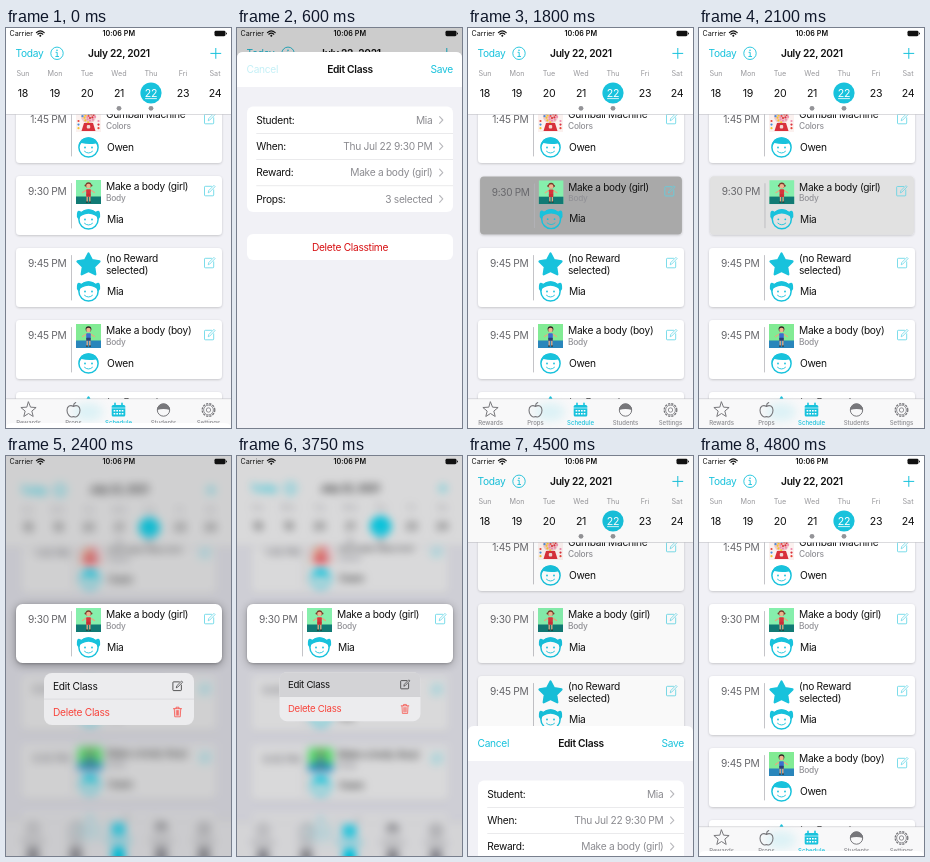
Recreate the animation shown at these times as an HTML page. Size 225 px wide and 400 px high, loop 4.95 s.

```html
<!DOCTYPE html>
<html lang="en">
<head>
<meta charset="utf-8">
<title>Class schedule</title>
<style>
html, body { margin: 0; width: 100%; height: 100%; overflow: hidden; background: #f1f1f6; }
svg { display: block; width: 100vw; height: 100vh; }
text { font-family: Inter, "Liberation Sans", sans-serif; white-space: pre; }
</style>
</head>
<body>
<svg id="stage" viewBox="0 0 225 400" preserveAspectRatio="none"></svg>
<script>
const LOOP = 4950, STEP = 150;
const CYAN = '#18c2dc', GRAY = '#8b8b90', PAGE = '#f1f1f6';
const SHEET_TOP = 24;

// Drawing helpers
const rect = (x, y, w, h, fill, r = 0, more = '') =>
  `<rect x="${x}" y="${y}" width="${w}" height="${h}" rx="${r}" fill="${fill}" ${more}/>`;
const circle = (x, y, r, fill, more = '') =>
  `<circle cx="${x}" cy="${y}" r="${r}" fill="${fill}" ${more}/>`;
const ring = (x, y, r, color, w = 1, more = '') =>
  circle(x, y, r, 'none', `stroke="${color}" stroke-width="${w}" ${more}`);
const line = (d, color, w = 1, more = 'stroke-linecap="round"') =>
  `<path d="${d}" fill="none" stroke="${color}" stroke-width="${w}" stroke-linejoin="round" ${more}/>`;
const shape = (d, fill) => `<path d="${d}" fill="${fill}"/>`;
const at = (x, y, body, scale = 1) => `<g transform="translate(${x} ${y}) scale(${scale})">${body}</g>`;

function text(x, y, s, { size = 10.2, fill = '#111', anchor = 'start', weight = 400, id = '' } = {}) {
  const spacing = size > 8 ? -0.028 * size : 0;
  return `<text ${id && `id="${id}"`} x="${x}" y="${y}" font-size="${size}" fill="${fill}" ` +
    `text-anchor="${anchor}" font-weight="${weight}" letter-spacing="${spacing}">${s}</text>`;
}

function starPath(r, inner) {
  const pts = Array.from({ length: 10 }, (_, i) => {
    const a = i * Math.PI / 5 - Math.PI / 2, q = i % 2 ? inner : r;
    return (q * Math.cos(a)).toFixed(2) + ' ' + (q * Math.sin(a)).toFixed(2);
  });
  return 'M' + pts.join('L') + 'Z';
}

// Icons, each centred on 0,0
const pencilBox = color =>
  line('M2 -4.5H-4.2Q-5 -4.5 -5 -3.7V4.2Q-5 5 -4.2 5H3.4Q4.2 5 4.2 4.2V-1', color, 0.8) +
  line('M-1.2 1.6L-.8 -.2L4.4 -5.4L5.6 -4.2L.5 1Z', color, 0.7);

const trash = color =>
  line('M-4.4 -3.6H4.4M-1.6 -3.8V-5.2H1.6V-3.8M-3.5 -3.4L-3 5.2H3L3.5 -3.4M-1.3 -1.6V3.5M0 -1.6V3.5M1.3 -1.6V3.5', color, 0.8);

const face = girl =>
  ring(0, 0, 9.6, CYAN, 1.5) +
  (girl
    ? shape('M-9.8 -1Q-9.5 -10 0 -10.3Q9.5 -10 9.8 -1Q7 -5.4 0 -5.8Q-7 -5.4 -9.8 -1Z', CYAN) +
      shape('M-7 -7.5Q-11.5 -11 -11.6 -5Q-12.4 -2 -10 0ZM7 -7.5Q11.5 -11 11.6 -5Q12.4 -2 10 0Z', CYAN)
    : shape('M-9.8 -1Q-9.5 -10 0 -10.3Q9.5 -10 9.8 -1L7.5 -4Q0 -2.6 -7 -4.4Z', CYAN)) +
  circle(-3.5, 0, 0.9, CYAN) + circle(3.5, 0, 0.9, CYAN) +
  line('M-4 3.8Q0 7.4 4 3.8', CYAN, 0.9);

const kid = (girl, shirt, pants) =>
  rect(-12.5, -12, 25, 24, girl ? '#86efac' : '#82eb94') +
  rect(-12.5, 4.5, 25, 7.5, girl ? '#117a74' : '#2a86bb') +
  line('M-2 -2L-6 0.5M2 -2L6 0.5', '#e7a981', 1.2) +
  line('M-1.3 4V9.5M1.3 4V9.5', '#e7a981', 1.3) +
  rect(-2.3, -2.8, 4.6, 5, shirt, 0.8) + rect(-2.3, 1.8, 4.6, 3, pants, 0.5) +
  circle(0, -6.9, 2.9, girl ? '#7a3a2a' : '#2f2424') +
  (girl ? circle(-3, -6.4, 1, '#7a3a2a') + circle(3, -6.4, 1, '#7a3a2a') : '') +
  circle(0, -6, 2.3, '#efb48e') +
  line('M-2 10H-1M1 10H2', '#222', 1.1);

function gumballs() {
  const colors = ['#e8443a', '#f08cb0', '#4a90d9', '#d8303a', '#f4c430'];
  let s = rect(-12.5, -12, 25, 24, '#fbf1ef') + circle(0, -4, 7.6, '#f0c9c9');
  for (let i = 0; i < 22; i++) {
    const r = 1.45 * Math.sqrt(i), a = i * 2.4;
    s += circle((r * Math.cos(a)).toFixed(1), (r * Math.sin(a) - 4).toFixed(1), 1.1, colors[i % 5]);
  }
  s += shape('M-4.5 3H4.5L7 11H-7Z', '#d8303a') + rect(-1.7, 5, 3.4, 3.4, '#f1d9d6', 1);
  for (let i = 0; i < 6; i++)
    s += circle(i % 2 ? 10 : -10, 1 + 3.6 * (i >> 1), 1.1, colors[i % 5]);
  return s;
}

const bigStar = `<path d="${starPath(11.6, 6)}" fill="${CYAN}" stroke="${CYAN}" stroke-width="2.2" stroke-linejoin="round"/>`;

// One class card, with its top left corner on 0,0
function card({ time, art, title, sub, name, girl }, id = '') {
  const lines = Array.isArray(title) ? title : [title];
  return rect(0, 0, 206, 59, '#fff', 4, `filter="url(#shadow)" ${id && `id="${id}"`}`) +
    text(50.5, 19.4, time, { fill: '#67676b', anchor: 'end' }) +
    line('M55.5 7.5V52', '#b5b5ba', 0.8) +
    at(72.5, 16, art) +
    lines.map((s, i) => text(90, 14.4 + 11.8 * i, s)).join('') +
    (sub ? text(90, 24.6, sub, { size: 8.4, fill: '#929297', weight: 500 }) : '') +
    at(72.5, 43.5, face(girl)) +
    text(91, 46.8, name) +
    at(193.5, 14.8, pencilBox('#5bd3e5'));
}

const BOY = 'Owen', GIRL = 'Mia';
const noReward = { time: '9:45 PM', art: at(0, 1, bigStar), title: ['(no Reward', 'selected)'], name: GIRL, girl: true };
const classes = [
  { time: '1:45 PM', art: gumballs(), title: 'Gumball Machine', sub: 'Colors', name: BOY },
  { time: '9:30 PM', art: kid(true, '#d9343c', '#c92f38'), title: 'Make a body (girl)', sub: 'Body', name: GIRL, girl: true },
  noReward,
  { time: '9:45 PM', art: kid(false, '#3a6fd0', '#2b3f78'), title: 'Make a body (boy)', sub: 'Body', name: BOY },
  noReward
];

const cards = () => classes.map((c, i) => i === 1 ? '' : at(10, 76 + 72 * i, card(c))).join('');

function header() {
  const days = ['Sun', 'Mon', 'Tue', 'Wed', 'Thu', 'Fri', 'Sat'];
  return rect(-20, -30, 265, 116, '#fff') + rect(-20, 86, 265, 0.6, '#c4c4c8') +
    text(9.5, 29, 'Today', { fill: CYAN }) +
    ring(51, 25.3, 6.2, CYAN, 0.9) +
    line('M50 24.3H51.2V28.4M49.8 28.5H52.6', CYAN, 0.9) + circle(51, 22.2, 0.8, CYAN) +
    text(112.9, 28.8, 'July 22, 2021', { anchor: 'middle', weight: 600 }) +
    line('M204.8 25.4H214.8M209.8 20.4V30.4', CYAN, 1) +
    circle(145, 65, 10.6, CYAN) +
    days.map((d, i) => {
      const x = 17 + 32 * i;
      return text(x, 48.4, d, { size: 7.2, fill: '#98989c', anchor: 'middle' }) +
        text(x, 68.8, 18 + i, { size: 10.6, fill: i === 4 ? '#fff' : '#111', anchor: 'middle' });
    }).join('') +
    line('M139.5 70.6H150.5', '#fff', 0.8) +
    circle(113, 80.3, 2.4, '#949498') + circle(145, 80.3, 2.4, '#949498');
}

function tabBar() {
  const c = '#77777b';
  const tabs = [
    ['Rewards', line(starPath(8, 3.5), c)],
    ['Props', line('M0 -3.5C-3 -5.5 -6.5 -4 -6.5 .2C-6.5 4 -3.6 7.2 -1.8 7Q0 6.2 1.8 7C3.6 7.2 6.5 4 6.5 .2C6.5 -4 3 -5.5 0 -3.5ZM0 -4Q0 -6.5 2.2 -7.5', c, 1.1)],
    ['Schedule', rect(-6.8, -5, 13.6, 11.5, CYAN, 1.5) + line('M-3.5 -6.8V-4M3.5 -6.8V-4', CYAN, 1.6) +
      line('M-6.8 -2H6.8', '#fff', 0.6) +
      line('M-4.9 .8H5M-4.9 3.8H5', '#fff', 1.5, 'stroke-dasharray="1.7 1"')],
    ['Students', ring(0, 0, 6.2, c) + shape('M-6.5 0A6.5 6.5 0 0 1 6.5 0Q0 -2 -6.5 0Z', c)],
    ['Settings', ring(0, 0, 6.3, c, 1.3, 'stroke-dasharray="2.2 1.1"') + ring(0, 0, 4.9, c, 0.8) + ring(0, 0, 2.2, c, 0.8)]
  ];
  const tint = i => i === 2 ? CYAN : '#8c8c90';
  return rect(-20, 371, 265, 60, '#f8f8f9') +
    `<ellipse cx="82" cy="384" rx="15" ry="9" fill="${CYAN}" opacity=".12" filter="url(#soft)"/>` +
    rect(-20, 370.6, 265, 0.5, '#b9b9bd') +
    tabs.map(([name, icon], i) => at(22.5 + 45 * i, 382, icon +
      text(0, 15.2, name, { size: 6, fill: tint(i), anchor: 'middle', weight: 500 }) +
      // below the stage; shows as a smear when the page shrinks
      rect(-6, 19, 12, 30, tint(i)))).join('');
}

const statusBar = () =>
  text(3.5, 8.2, 'Carrier', { size: 7.2 }) +
  line('M30.4 4.6Q34.3 1.2 38.2 4.6M31.8 6.2Q34.3 4 36.8 6.2', '#111', 1.2) + circle(34.3, 7.7, 1, '#111') +
  text(112.8, 8.2, '10:06 PM', { size: 7.2, anchor: 'middle', weight: 600 }) +
  rect(208.5, 2.8, 11, 5.4, '#111', 1.4) + rect(220, 4.6, 0.9, 1.8, '#111', 0.4);

function menu() {
  const row = (y, label, color, icon) => text(47, y + 3.6, label, { fill: color }) + at(171.5, y, icon, 0.92);
  return rect(38, 217, 150, 52, '#ececee', 8) +
    `<path id="chosen" d="M38 243V225Q38 217 46 217H180Q188 217 188 225V243Z" fill="#d3d3d6"/>` +
    rect(38, 242.8, 150, 0.5, '#c9c9cd') +
    row(230, 'Edit Class', '#111', pencilBox('#222')) +
    row(256, 'Delete Class', '#f8443c', trash('#f8443c'));
}

function sheet() {
  const rows = [['Student:', GIRL], ['When:', 'Thu Jul 22 9:30 PM'], ['Reward:', 'Make a body (girl)'], ['Props:', '3 selected']];
  return rect(0, 0, 225, 420, PAGE, 6) +
    shape('M0 35V6Q0 0 6 0H219Q225 0 225 6V35Z', '#fff') +
    text(9.5, 20.8, 'Cancel', { fill: CYAN, id: 'cancel' }) +
    text(113, 20.8, 'Edit Class', { anchor: 'middle', weight: 600 }) +
    text(216, 20.8, 'Save', { fill: CYAN, anchor: 'end' }) +
    rect(10, 54.5, 206, 105.5, '#fff', 6) +
    rows.map(([label, value], i) => {
      const y = 68 + 26.3 * i;
      return text(19.3, y + 3.7, label) +
        text(195.5, y + 3.7, value, { fill: GRAY, anchor: 'end' }) +
        line(`M202.6 ${y - 3.4}L205.8 ${y}L202.6 ${y + 3.4}`, '#b8b8bc', 1.1) +
        (i ? rect(19.3, y - 13.3, 196.7, 0.5, '#d4d4d8') : '');
    }).join('') +
    rect(10, 182, 206, 26, '#fff', 6) +
    text(113, 198.6, 'Delete Classtime', { fill: '#d70f12', anchor: 'middle' });
}

const stage = document.getElementById('stage');
stage.innerHTML = `
  <defs>
    <filter id="shadow" x="-5%" y="-15%" width="110%" height="135%">
      <feDropShadow dx="0" dy=".8" stdDeviation="1.3" flood-color="#000" flood-opacity=".2"/>
    </filter>
    <filter id="soft" x="-50%" y="-60%" width="200%" height="220%"><feGaussianBlur stdDeviation="5"/></filter>
    <filter id="blur" filterUnits="userSpaceOnUse" x="-20" y="-20" width="265" height="450" color-interpolation-filters="sRGB">
      <feGaussianBlur id="blurSize" stdDeviation="0"/>
      <feColorMatrix type="saturate" values="1.7"/>
    </filter>
  </defs>
  ${rect(0, 0, 225, 400, PAGE)}
  <g id="back">${rect(-20, -30, 265, 460, PAGE)}${cards()}${header()}${tabBar()}</g>
  ${rect(0, 0, 225, 400, '#444448', 0, 'id="veil"')}
  ${rect(10, 150, 206, 59, '#000', 6, 'id="glow" filter="url(#soft)"')}
  <g id="pressed">${card(classes[1], 'pressedFill')}</g>
  <g id="menu">${menu()}</g>
  ${statusBar()}
  ${rect(0, 0, 225, 400, '#000', 0, 'id="dim"')}
  <g id="sheet">${sheet()}</g>`;

const el = id => document.getElementById(id);
const set = (id, attrs) => { for (const k in attrs) el(id).setAttribute(k, attrs[k]); };
const scaleAbout = (x, y, s) => `translate(${x} ${y}) scale(${s}) translate(${-x} ${-y})`;

// Linear interpolation through [time, value] pairs
function track(t, keys) {
  if (t <= keys[0][0]) return keys[0][1];
  for (let i = 1; i < keys.length; i++) {
    const [t0, a] = keys[i - 1], [t1, b] = keys[i];
    if (t <= t1) return a + (b - a) * (t - t0) / (t1 - t0);
  }
  return keys[keys.length - 1][1];
}

const sheetY = [[0, 395], [150, 170], [300, 44], [450, 26], [600, 24], [750, 70], [900, 270], [1050, 372], [1200, 396], [1350, 402],
  [3750, 402], [3900, 190], [4050, 44], [4200, 24], [4350, 70], [4500, 270], [4650, 372], [4800, 395]];
const press = [[1350, 0], [1650, 1], [1800, 1], [2100, 0.35], [2250, 0]];
const shrink = [[1350, 1], [1800, 0.98], [1950, 0.98], [2250, 1]];
const blurring = [[2100, 0], [2250, 0.6], [2400, 1], [3600, 1], [3750, 0.8], [3900, 0.25], [4050, 0]];
const menuScale = [[2100, 0.3], [2250, 0.75], [2400, 1], [3600, 1], [3750, 0.94], [3900, 0.5]];
const menuAlpha = [[2100, 0], [2250, 0.75], [2400, 1], [3750, 1], [3900, 0.2], [4050, 0]];
const cancelAlpha = [[450, 1], [600, 0.25], [750, 0.5], [900, 1], [4050, 1], [4200, 0.25], [4350, 0.5], [4500, 1]];
const chosenAlpha = [[3600, 0], [3750, 1]];

function draw(ms) {
  const t = Math.floor((ms % LOOP) / STEP) * STEP;

  const b = track(t, blurring);
  if (b) el('back').setAttribute('filter', 'url(#blur)');
  else el('back').removeAttribute('filter');
  set('blurSize', { stdDeviation: 5.2 * b });
  set('back', { transform: scaleAbout(112.5, 200, 1 - 0.05 * b) });
  set('veil', { opacity: 0.25 * b });
  set('glow', { opacity: 0.35 * b });

  const shade = Math.round(255 - 86 * track(t, press));
  set('pressed', { transform: `${scaleAbout(113, 177.5, track(t, shrink))} translate(10 148)` });
  set('pressedFill', { fill: `rgb(${shade},${shade},${shade})`, rx: 4 + 2.5 * b });

  set('menu', { transform: scaleAbout(113, 205, track(t, menuScale)), opacity: track(t, menuAlpha) });
  set('chosen', { opacity: track(t, chosenAlpha) });

  const y = track(t, sheetY);
  const raised = Math.max(0, (400 - y) / (400 - SHEET_TOP));
  set('sheet', { transform: `translate(0 ${y})` });
  set('dim', { opacity: 0.2 * raised * raised });
  set('cancel', { opacity: track(t, cancelAlpha) });
}

const start = performance.now();
function tick() {
  draw(performance.now() - start);
  requestAnimationFrame(tick);
}
tick();
</script>
</body>
</html>
```
